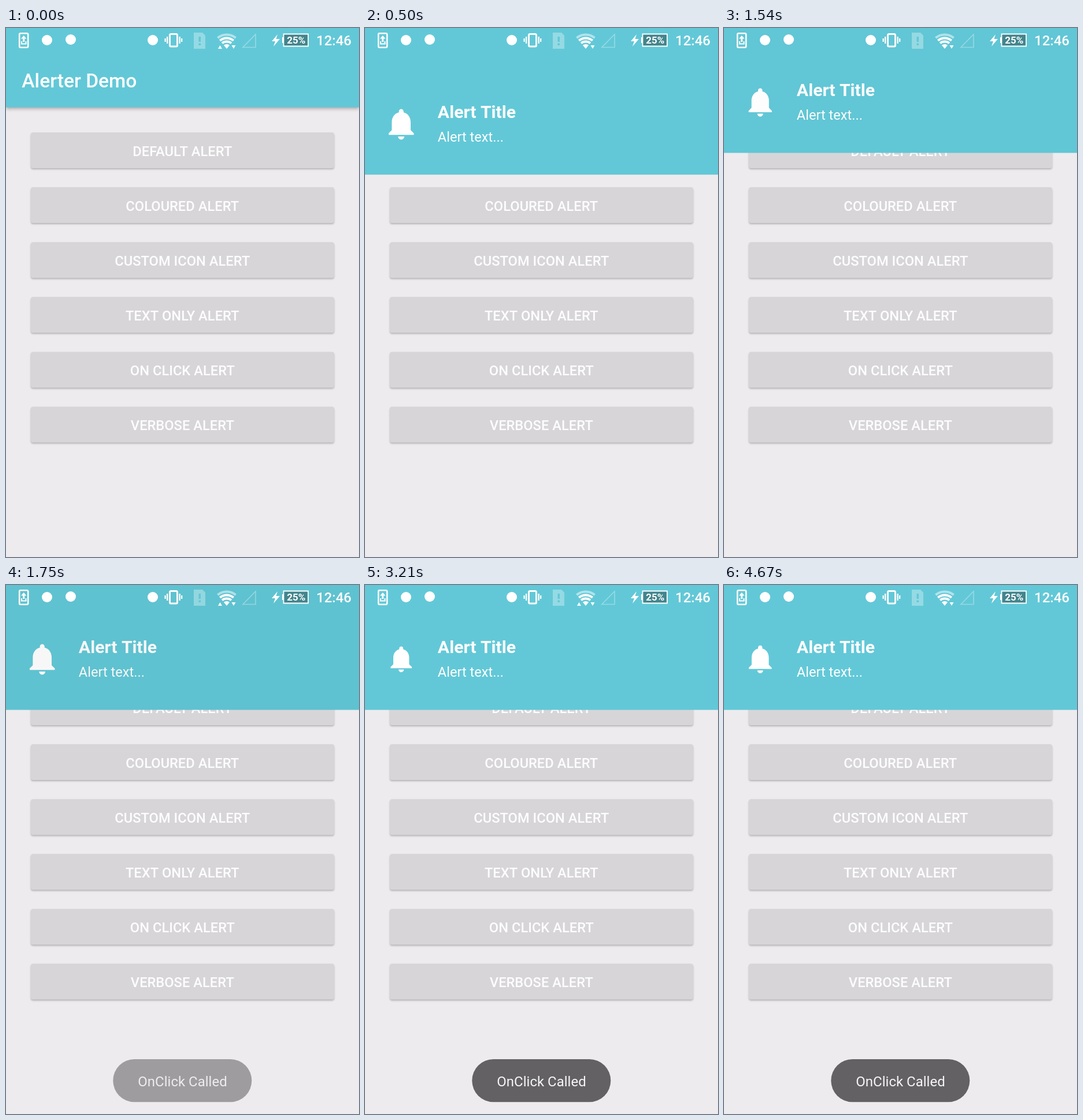
Recreate the animation shown at these times as an HTML page with a canvas. Size 611 px wide and 917 px high, loop 4710 ms.

```html
<!DOCTYPE html>
<html lang="en">
<head>
<meta charset="utf-8">
<title>Alerter Demo</title>
<style>
  html, body { margin: 0; width: 100%; height: 100%; overflow: hidden; background: #eeebee; }
  canvas { display: block; width: 611px; height: 917px; }
</style>
</head>
<body>
<canvas id="stage" width="611" height="917"></canvas>
<script>
const ctx = document.getElementById('stage').getContext('2d');
const WIDTH = 611, HEIGHT = 917, LOOP = 4710;
const TEAL = '#62c8d7', PAPER = '#eeebee', FAINT = 'rgba(255,255,255,.33)';
const LABELS = ['DEFAULT ALERT', 'COLOURED ALERT', 'CUSTOM ICON ALERT',
  'TEXT ONLY ALERT', 'ON CLICK ALERT', 'VERBOSE ALERT'];
const SLIDE = { start: 200, length: 540, height: 288, rest: 216.4 };
// Bell phase over time: even values are full size, odd values smallest.
const PULSE = [[760, 0], [1750, 2], [2070, 4], [4834, 12]];
const BELL = new Path2D('M12 22c1.1 0 2-.9 2-2h-4c0 1.1.89 2 2 2zm6-6v-5c0-3.07-1.64-5.64' +
  '-4.5-6.32V4c0-.83-.67-1.5-1.5-1.5s-1.5.67-1.5 1.5v.68C7.63 5.36 6 7.92 6 11v5l-2 2v1h16v-1z');

const clamp = x => Math.max(0, Math.min(1, x));
const ramp = (t, from, to) => clamp((t - from) / (to - from));

function overshoot(p) {
  const q = p - 1;
  return q * q * (3 * q + 2) + 1;
}

function box(x, y, w, h, color, radius = 0) {
  ctx.fillStyle = color;
  ctx.beginPath();
  ctx.roundRect(x, y, w, h, radius);
  ctx.fill();
}

function shadowBox(x, y, w, h, color, radius, blur, strength) {
  ctx.save();
  ctx.shadowColor = `rgba(0,0,0,${strength})`;
  ctx.shadowBlur = blur;
  ctx.shadowOffsetY = 2;
  box(x, y, w, h, color, radius);
  ctx.restore();
}

function frame(x, y, w, h, line, radius = 0) {
  ctx.strokeStyle = '#fff';
  ctx.lineWidth = line;
  ctx.beginPath();
  ctx.roundRect(x, y, w, h, radius);
  ctx.stroke();
}

function poly(points, color = '#fff') {
  ctx.fillStyle = color;
  ctx.beginPath();
  points.forEach(([x, y]) => ctx.lineTo(x, y));
  ctx.closePath();
  ctx.fill();
}

function disc(x, y, r) {
  box(x - r, y - r, 2 * r, 2 * r, '#fff', r);
}

function text(string, x, y, font, align = 'left', color = '#fff') {
  ctx.font = `${font} Roboto, sans-serif`;
  ctx.textAlign = align;
  ctx.fillStyle = color;
  ctx.fillText(string, x, y);
}

function drawPage() {
  box(0, 0, WIDTH, HEIGHT, PAPER);
  LABELS.forEach((label, i) => {
    const y = 181 + 95.1 * i;
    shadowBox(43, y, 525, 62, '#d7d5d8', 4, 3, 0.24);
    text(label, 305.3, y + 40.7, '500 23.7px', 'center', '#fdfcfe');
  });
  shadowBox(0, 0, WIDTH, 137.5, TEAL, 0, 6, 0.3);
  text('Alerter Demo', 27.2, 103.3, '500 33.6px');
}

function bellScale(t) {
  let i = 0;
  while (i < PULSE.length - 2 && t > PULSE[i + 1][0]) i++;
  const [[t0, p0], [t1, p1]] = [PULSE[i], PULSE[i + 1]];
  const phase = p0 + (p1 - p0) * ramp(t, t0, t1);
  return 0.9 + 0.1 * Math.cos(Math.PI * phase);
}

function drawAlert(t) {
  if (t < SLIDE.start) return;
  const travel = overshoot(ramp(t, SLIDE.start, SLIDE.start + SLIDE.length));
  const offset = SLIDE.height * (travel - 1);
  const bottom = SLIDE.rest + offset;
  if (bottom <= 0) return;
  box(0, 0, WIDTH, bottom, TEAL);
  ctx.save();
  ctx.translate(0, offset);
  text('Alert Title', 125.8, 118, 'bold 30.2px');
  text('Alert text...', 125.8, 158.8, '23.6px');
  const scale = 2.72 * bellScale(t);
  ctx.translate(62.7, 128.3);
  ctx.scale(scale, scale);
  ctx.translate(-12, -12);
  ctx.fillStyle = '#fff';
  ctx.fill(BELL);
  ctx.restore();
  const press = ramp(t, 1500, 1650) * (1 - ramp(t, 1800, 2100));
  if (press > 0) box(0, 0, WIDTH, bottom, `rgba(0,0,0,${0.032 * press})`);
}

function drawWifi(t) {
  const band = (r, line, color) => {
    ctx.strokeStyle = color;
    ctx.lineWidth = line;
    ctx.beginPath();
    ctx.arc(382, 36, r, -Math.PI * 0.72, -Math.PI * 0.28);
    ctx.stroke();
  };
  band(24.5, 4, 'rgba(255,255,255,.5)');
  band(18.5, 3.8, '#fff');
  band(12.5, 3.8, '#fff');
  band(4, 8, '#fff');
  poly([[390.5, 30], [397.5, 30], [394, 36]]);
  if (t < 300 || (t > 1600 && t < 4500)) poly([[367, 36], [374, 36], [370.5, 30]]);
}

function drawStatus(t) {
  frame(23.2, 9.3, 15, 24.5, 2.6, 2);
  poly([[30.7, 13], [35.5, 18.5], [32.2, 18.5], [32.2, 24], [29.2, 24], [29.2, 18.5], [25.9, 18.5]]);
  box(26, 23, 2, 5, '#fff');
  box(33.5, 23, 2, 5, '#fff');
  box(26, 26.5, 9.5, 2, '#fff');

  disc(71, 21, 9);
  disc(112, 20, 9);
  disc(254, 21, 9);

  frame(283.5, 10.5, 13, 21.5, 3, 2);
  [[278, 15, 12], [274.5, 18, 6], [299.5, 15, 12], [303, 18, 6]]
    .forEach(([x, y, h]) => box(x, y, 2.3, h, '#fff'));

  poly([[325, 8], [340, 8], [345, 13], [345, 36], [325, 36]], FAINT);
  box(333.5, 15, 3.5, 9, TEAL);
  box(333.5, 26.5, 3.5, 3.5, TEAL);

  drawWifi(t);

  ctx.strokeStyle = FAINT;
  ctx.lineWidth = 1.6;
  ctx.beginPath();
  ctx.moveTo(410, 33.5);
  ctx.lineTo(432, 33.5);
  ctx.lineTo(432, 11);
  ctx.closePath();
  ctx.stroke();

  poly([[470, 11], [460, 23], [466, 23], [463, 32], [474, 19], [467.5, 19]]);
  box(478, 16, 3, 10, '#fff');
  box(480.5, 10.5, 42.5, 21, '#43858d');
  frame(480.5, 10.5, 42.5, 21, 1.8);
  text('25%', 502.3, 27.2, 'bold 17px', 'center');
  text('12:46', 598, 30.3, '500 24px', 'right');
}

function drawToast(t) {
  const p = ramp(t, 1580, 2080);
  if (p === 0) return;
  ctx.save();
  ctx.globalAlpha = 1 - (1 - p) ** 2;
  box(185.3, 822, 240, 74.3, '#636164', 37);
  ctx.globalAlpha = Math.min(1, 1.6 * ctx.globalAlpha);
  text('OnClick Called', 305.5, 868.6, '24px', 'center', '#f5f4f6');
  ctx.restore();
}

function draw() {
  const t = performance.now() % LOOP;
  drawPage();
  drawAlert(t);
  drawStatus(t);
  drawToast(t);
  requestAnimationFrame(draw);
}
draw();
</script>
</body>
</html>
```
